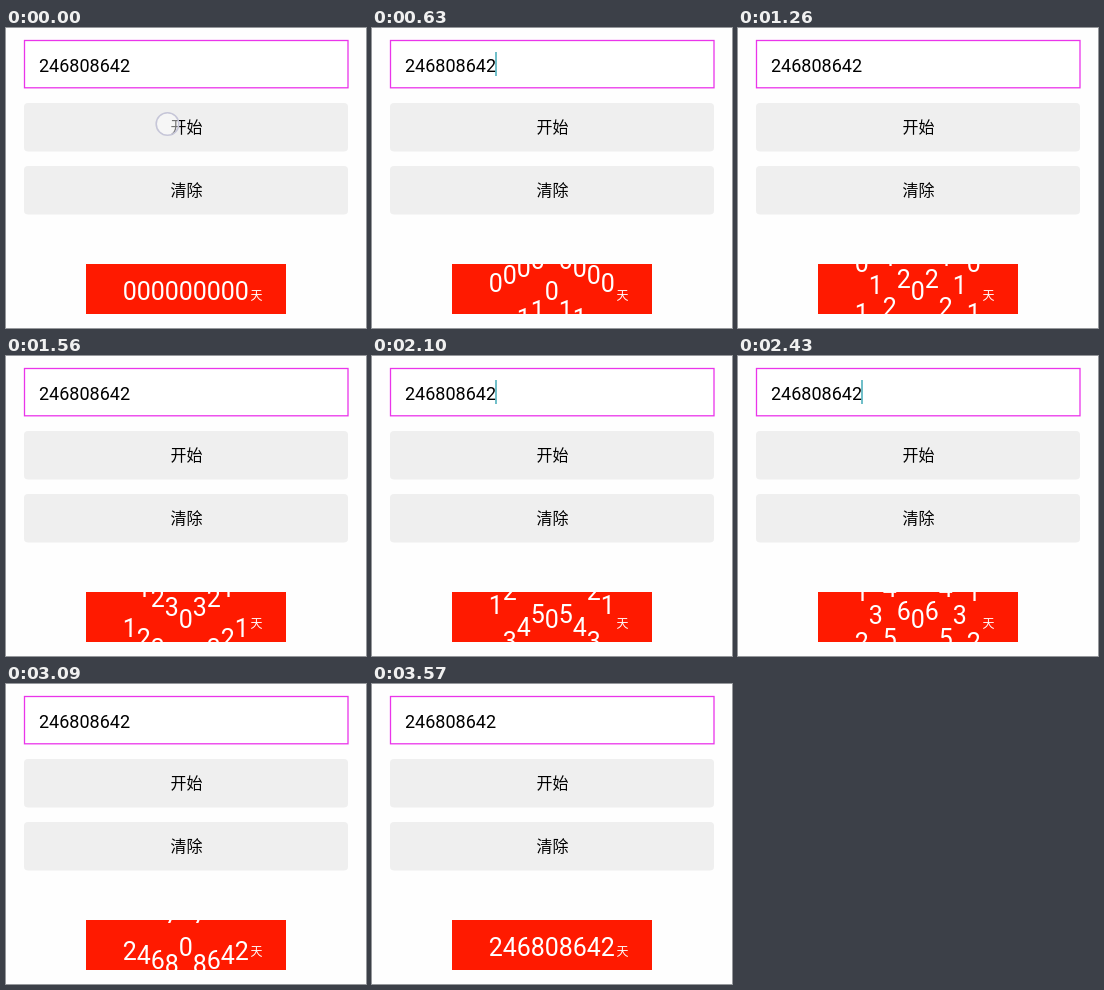
Recreate the animation shown at these times as an HTML page. Size 360 by 300 pixels, loop 3.63 s.

```html
<!DOCTYPE html>
<html lang="zh-CN">
<head>
<meta charset="utf-8">
<title>Rolling number</title>
<style>
  html, body { margin: 0; width: 100%; height: 100%; overflow: hidden; background: #fefefe; }
  svg { display: block; width: 360px; height: 300px; }
  text { font-family: Roboto, "Noto Sans CJK SC", "Noto Sans CJK", sans-serif; }
  .label { font-size: 16px; text-anchor: middle; }
  .unit { font-size: 12px; fill: #fff; }
  .digits { font-size: 25px; fill: #fff; text-anchor: middle; }
</style>
</head>
<body>
<svg viewBox="0 0 360 300">
  <clipPath id="panel"><rect x="80" y="236" width="200" height="50"/></clipPath>

  <rect x="18.5" y="12.5" width="323.5" height="47.3" fill="#fff" stroke="#ea35ea" stroke-width="1.3"/>
  <text x="33" y="43.5" font-size="18">246808642</text>
  <rect id="caret" x="123.2" y="24" width="1.6" height="24" fill="#4fb0bc"/>

  <g fill="#efefef">
    <rect x="18" y="75" width="324" height="48.5" rx="4"/>
    <rect x="18" y="138" width="324" height="48.5" rx="4"/>
  </g>
  <text class="label" x="180.5" y="105">开始</text>
  <text class="label" x="180.5" y="168">清除</text>

  <circle id="touch" cx="161.5" cy="96" r="11.3" fill="#fff" fill-opacity=".45" stroke="#c6c6d8" stroke-width="1.6"/>

  <rect x="80" y="236" width="200" height="50" fill="#ff1a00"/>
  <g id="digits" class="digits" clip-path="url(#panel)"></g>
  <text class="unit" x="244.5" y="271.5">天</text>
</svg>
<script>
const LOOP = 3630, STEP = 30;
const ROW = 50, COLUMN = 14, CENTER = 179.8, BASELINE = 271.5;
const BLINK = 900, BLINK_START = 120;
const ROLL_LEAD = 10, ROLL_TIME = 3585, LAST_STEP = 3330, SNAP = 3570;

const byId = id => document.getElementById(id);
const svgNode = name => document.createElementNS("http://www.w3.org/2000/svg", name);
const digits = byId("digits"), caret = byId("caret"), touch = byId("touch");

const columns = [..."246808642"].map((char, i) => {
  const target = Number(char), strip = svgNode("g");
  for (let n = 0; n <= target; n++) {
    const text = svgNode("text");
    text.setAttribute("x", CENTER + (i - 4) * COLUMN);
    text.setAttribute("y", BASELINE + n * ROW);
    text.textContent = n;
    strip.append(text);
  }
  digits.append(strip);
  return { strip, target };
});

// Cosine ease; the last few pixels pause, then snap into place.
function rollProgress(t) {
  if (t === 0) return 0;
  if (t >= SNAP) return 1;
  const u = (Math.min(t, LAST_STEP) + ROLL_LEAD) / ROLL_TIME;
  return (1 - Math.cos(Math.PI * u)) / 2;
}

function draw(now) {
  const t = Math.floor((now % LOOP) / STEP) * STEP;
  const progress = rollProgress(t);
  for (const { strip, target } of columns) {
    strip.setAttribute("transform", `translate(0 ${-progress * target * ROW})`);
  }
  const caretOn = t >= BLINK_START && Math.floor((t - BLINK_START) / BLINK) % 2 === 0;
  caret.setAttribute("opacity", caretOn && t < BLINK_START + 3 * BLINK ? 1 : 0);
  touch.setAttribute("opacity", Math.max(0, 1 - t / 150));
}

function frame() {
  draw(performance.now());
  requestAnimationFrame(frame);
}
frame();
</script>
</body>
</html>
```
